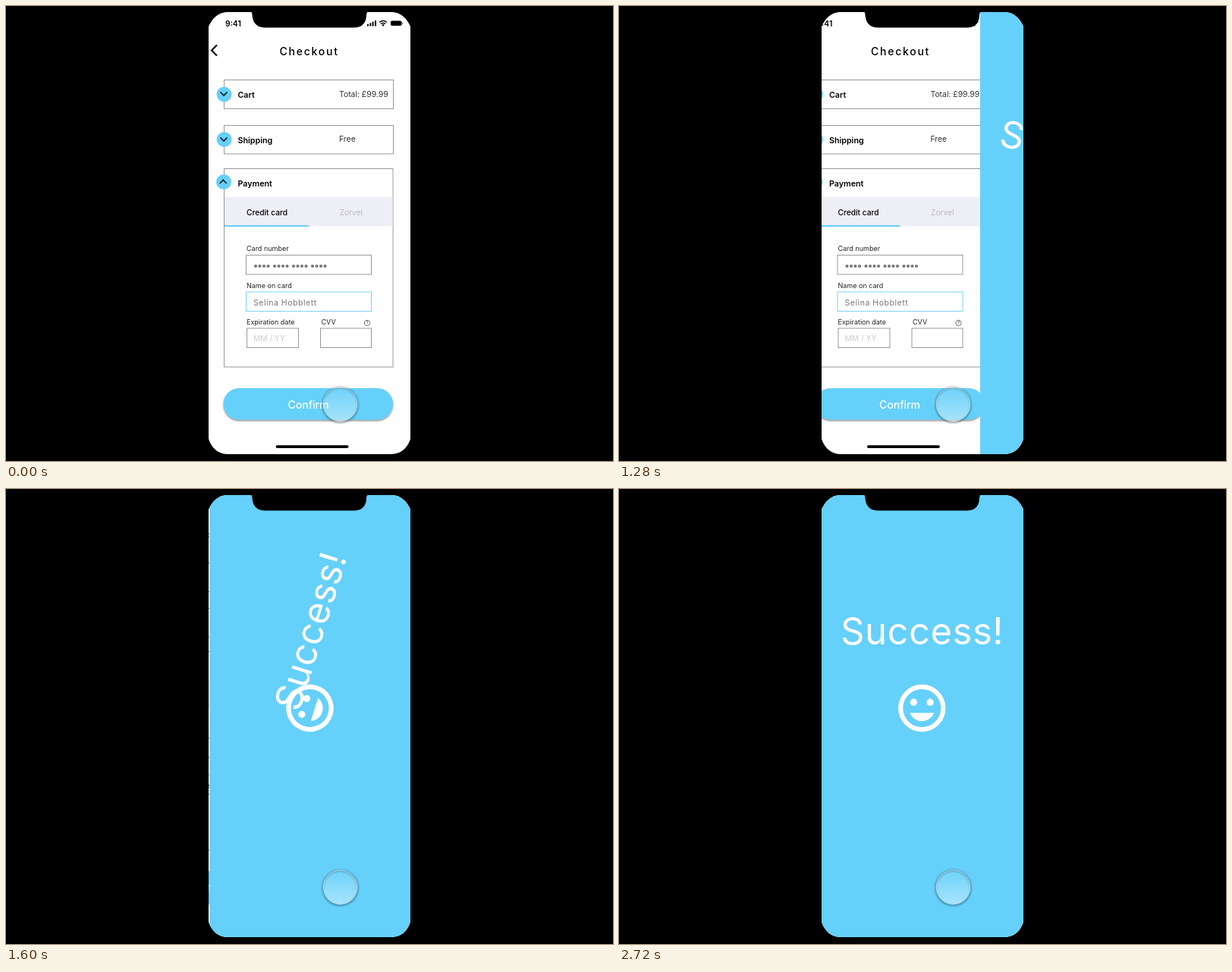
An HTML page for the animation above (2760 ms loop, 800 by 600 pixels).

```html
<!DOCTYPE html>
<html lang="en">
<head>
<meta charset="utf-8">
<title>Checkout</title>
<style>
  html, body { margin: 0; height: 100%; overflow: hidden; background: #000; }
  svg { display: block; width: 100%; height: 100%; font-family: Inter, sans-serif; }
  .box { fill: none; stroke: #999; }
  .line { fill: none; stroke: #111; stroke-width: 1.6; }
  .blue { fill: #65d0fa; }
  .heading { font-size: 10.7px; font-weight: 600; }
  .value { font-size: 10.4px; fill: #333; }
  .tab { font-size: 10.2px; }
  .label { font-size: 9px; fill: #222; }
</style>
</head>
<body>
<svg viewBox="0 0 800 600">
  <defs>
    <clipPath id="screen">
      <path d="M291 8H509Q525 9 533 27V571Q526 591 507 591H293Q274 591 267 571V27Q275 9 291 8Z"/>
    </clipPath>
    <linearGradient id="glass" x2="0" y2="1">
      <stop stop-color="#fff" stop-opacity=".06"/>
      <stop offset="1" stop-color="#fff" stop-opacity=".42"/>
    </linearGradient>
    <filter id="shadow" x="-10%" y="-20%" width="120%" height="150%">
      <feDropShadow dx="0" dy="1.5" stdDeviation="1" flood-opacity=".5"/>
    </filter>
    <filter id="halo" x="-20%" y="-20%" width="140%" height="140%">
      <feGaussianBlur stdDeviation="1.2"/>
    </filter>
  </defs>

  <g clip-path="url(#screen)">
    <path fill="#fff" d="M267 8h266v583H267z"/>

    <g id="checkout">
      <text x="289" y="27" font-size="10.3" font-weight="600">9:41</text>
      <path d="M476 24h2v2.5h-2zM479.3 22.5h2v4h-2zM482.6 20.7h2v5.8h-2zM486 19h2v7.500h-2z"/>
      <path class="line" d="M492 21.500q5-4 10 0M494 23.700q3-2.400 6 0"/>
      <circle cx="497" cy="25.300" r="1.200"/>
      <rect x="507" y="19.500" width="14.500" height="6.500" rx="1.800"/>
      <path d="M522.300 21.500v2.500" stroke="#555"/>
      <path class="line" style="stroke-width:2.200" d="M278 51.500l-7 7 7 7"/>
      <text x="360.500" y="65" font-size="14" font-weight="500" letter-spacing="1.750">Checkout</text>

      <rect class="box" x="287.500" y="97.500" width="223" height="38"/>
      <rect class="box" x="287.500" y="157.500" width="223" height="37.500"/>
      <rect class="box" x="287.500" y="214.500" width="222.500" height="261.500"/>
      <g class="blue">
        <circle cx="287.500" cy="116.500" r="10"/>
        <circle cx="287.500" cy="176" r="10"/>
        <circle cx="287" cy="232" r="10"/>
      </g>
      <path class="line" d="M282.500 113.500l4.500 4.500 4.500-4.500M282.500 173.500l4.500 4.500 4.500-4.500M281.700 234l4.500-4.500 4.500 4.500"/>
      <text class="heading" x="305.500" y="121">Cart</text>
      <text class="heading" x="305.500" y="180.500">Shipping</text>
      <text class="heading" x="305.500" y="237.500">Payment</text>
      <text class="value" x="439" y="120">Total: £99.99</text>
      <text class="value" x="439" y="179">Free</text>

      <path fill="#eeeef7" d="M288 252h221.500v38.500H288z"/>
      <path class="blue" d="M288 289h111v2H288z"/>
      <text class="tab" x="317" y="276" font-weight="500">Credit card</text>
      <text class="tab" x="439.500" y="276" fill="#bbb">Zorvel</text>

      <text class="label" x="317" y="323">Card number</text>
      <text class="label" x="317" y="372">Name on card</text>
      <text class="label" x="317" y="420">Expiration date</text>
      <text class="label" x="415.500" y="420">CVV</text>
      <rect class="box" x="316.500" y="328.500" width="165" height="25.500"/>
      <rect class="box" x="316.500" y="377" width="165" height="25.500" style="stroke:#7fd3ee"/>
      <rect class="box" x="317.500" y="425" width="68" height="25.500"/>
      <rect class="box" x="414.500" y="425" width="67" height="25.500"/>
      <g id="digits" fill="#777"></g>
      <text x="326" y="394.500" font-size="10.500" letter-spacing=".55" fill="#777">Selina Hobblett</text>
      <text x="326" y="442" font-size="10.300" fill="#ccc">MM / YY</text>
      <circle class="box" cx="476" cy="418" r="3.700" style="stroke:#555;stroke-width:.8"/>
      <text x="476" y="420.200" font-size="6" text-anchor="middle" fill="#333">?</text>

      <rect class="blue" x="286.500" y="504" width="223.500" height="41.500" rx="20.750" filter="url(#shadow)"/>
      <text x="371.500" y="530.500" font-size="14" font-weight="500" fill="#fff">Confirm</text>
      <rect x="355.500" y="579.300" width="96" height="3.600" rx="1.800"/>
    </g>

    <g id="success">
      <path class="blue" d="M267 8h268v583H267z"/>
      <g fill="#fff">
        <g id="word"><text y="18" font-size="49" letter-spacing=".5" text-anchor="middle">Success!</text></g>
        <g id="smile">
          <circle r="9" fill="none" stroke="#fff" stroke-width="2"/>
          <circle cx="-3.500" cy="-2.500" r="1.500"/>
          <circle cx="3.500" cy="-2.500" r="1.500"/>
          <path d="M0 5.500c2.330 0 4.310-1.460 5.110-3.500H-5.110C-4.310 4.040-2.330 5.500 0 5.500z"/>
        </g>
      </g>
    </g>

    <path d="M322 7Q324.500 8 324.500 12Q325.500 28.500 342 28.500H458Q474.500 28.500 475 12Q475 8 478 7Z"/>
    <circle cx="440.500" cy="526" r="23" fill="none" stroke="#245" stroke-opacity=".55" stroke-width="2" filter="url(#halo)"/>
    <circle cx="440.500" cy="525" r="22.300" fill="url(#glass)" stroke="#fff" stroke-opacity=".55"/>
  </g>
</svg>
<script>
  const LOOP = 2760, STEP = 40, WIDTH = 266;
  const byId = id => document.getElementById(id);
  const place = (id, transform) => byId(id).setAttribute('transform', transform);

  for (let i = 0; i < 16; i++) {
    const x = 329 + Math.floor(i / 4) * 25 + (i % 4) * 5.5;
    byId('digits').innerHTML += `<circle cx="${x}" cy="343" r="2.1"/>`;
  }

  // Eased progress along cubic-bezier(x1, 0, x2, 1)
  function ease(time, start, duration, x1, x2) {
    const u = Math.min(1, Math.max(0, (time - start) / duration));
    if (u === 0 || u === 1) return u;
    let low = 0, high = 1, s;
    for (let i = 0; i < 30; i++) {
      s = (low + high) / 2;
      const x = 3 * (1 - s) ** 2 * s * x1 + 3 * (1 - s) * s * s * x2 + s ** 3;
      if (x < u) low = s; else high = s;
    }
    return s * s * (3 - 2 * s);
  }

  function draw(now) {
    const time = Math.floor((now % LOOP) / STEP) * STEP;
    const slide = ease(time, 1072, 568, 0.6, 0.4);
    const angle = 360 * ease(time, 1089, 1046, 0.724, 0);
    place('checkout', `translate(${-slide * WIDTH / 2})`);
    place('success', `translate(${(1 - slide) * WIDTH})`);
    place('word', `translate(399.5 187) rotate(${angle})`);
    place('smile', `translate(399.2 289) rotate(${angle}) scale(3.12)`);
    requestAnimationFrame(draw);
  }
  draw(0);
</script>
</body>
</html>
```
